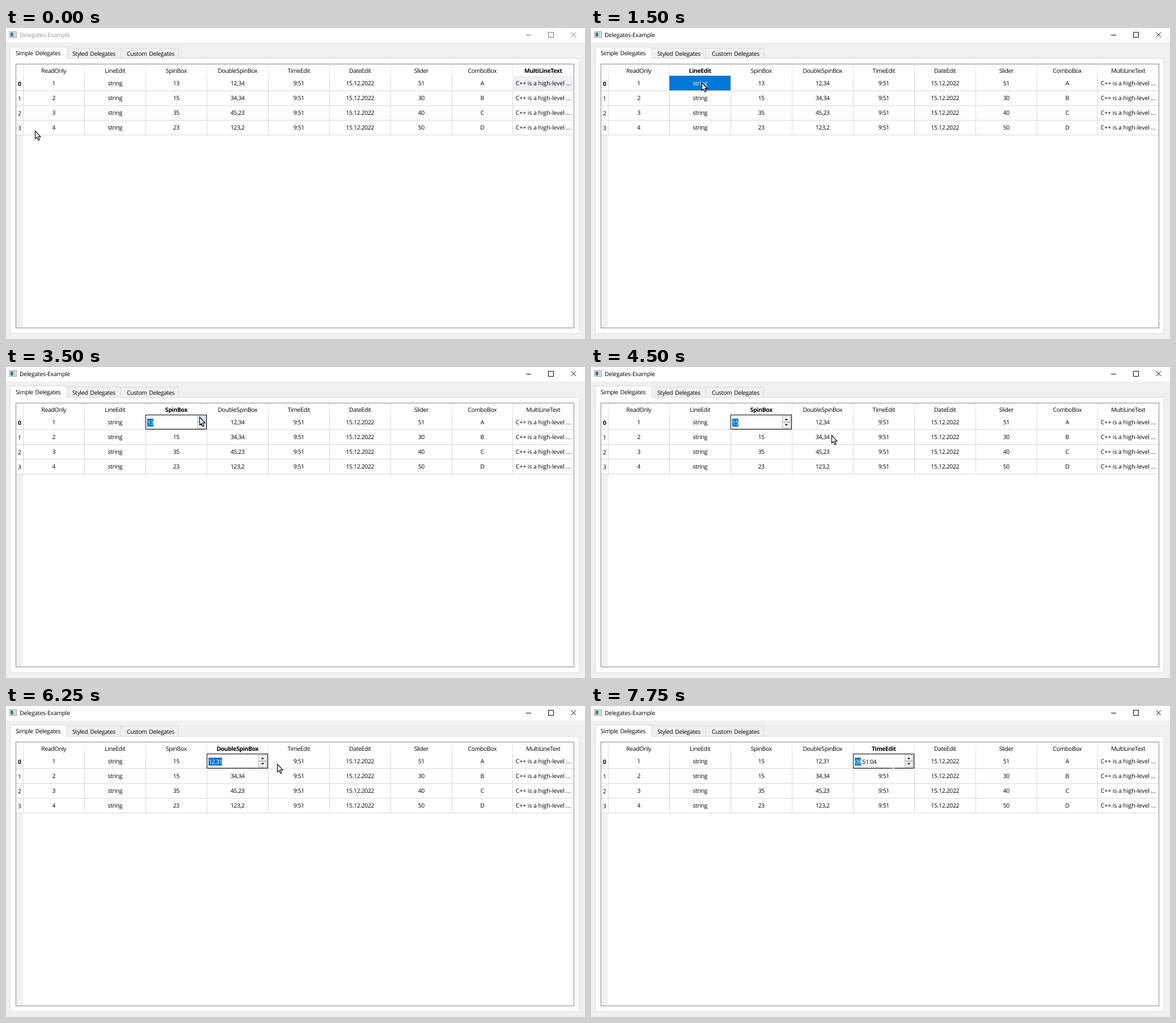
An HTML page that plays this animation: 1021 by 548 pixels, repeating every 8000 ms.

```html
<!DOCTYPE html>
<html lang="en">
<head>
<meta charset="utf-8">
<title>Delegates-Example</title>
<style>
html, body { margin: 0; width: 100%; height: 100%; overflow: hidden; background: #f0f0f0; }
svg { display: block; width: 1021px; height: 548px; }
text {
  font: 10.4px "Open Sans", "Noto Sans", sans-serif;
  letter-spacing: -.35px; word-spacing: 1.5px;
  text-rendering: geometricPrecision; fill: #000;
}
.mid { text-anchor: middle; }
.bold { font-weight: 700; }
.loose { letter-spacing: 0; word-spacing: 0; }
.title { letter-spacing: -.22px; }
</style>
</head>
<body>
<svg id="stage" viewBox="0 0 1021 548"></svg>
<script>
const NS = "http://www.w3.org/2000/svg";
const stage = document.getElementById("stage");
const LOOP = 8000;
const BLUE = "#0078d7", GRID = "#d8d8d8", EDGE = "#d9d9d9";
const TOP = 84, ROW = 26;
const edges = [30, 138, 246, 354, 462, 570, 678, 786, 893, 1001];
const heads = ["ReadOnly", "LineEdit", "SpinBox", "DoubleSpinBox", "TimeEdit",
  "DateEdit", "Slider", "ComboBox", "MultiLineText"];
const note = "C++ is a high-level ...";
const data = [
  ["13", "12,34", "51", "A"],
  ["15", "34,34", "30", "B"],
  ["35", "45,23", "40", "C"],
  ["23", "123,2", "50", "D"]
].map(([spin, dbl, slide, combo], i) =>
  [i + 1, "string", spin, dbl, "9:51", "15.12.2022", slide, combo, note]);

function add(tag, attrs, parent = stage) {
  const el = document.createElementNS(NS, tag);
  for (const k in attrs) el.setAttribute(k, attrs[k]);
  return parent.appendChild(el);
}
const box = (x, y, width, height, fill, stroke = "none", parent = stage) =>
  add("rect", { x, y, width, height, fill, stroke }, parent);
const line = (d, stroke, parent = stage) => add("path", { d, stroke, fill: "none" }, parent);
function label(str, x, y, cls = "", parent = stage) {
  const el = add("text", { x, y, class: cls }, parent);
  el.textContent = str;
  return el;
}
const center = c => (edges[c] + edges[c + 1]) / 2 + .3;

// Title bar
box(0, 0, 1021, 25.5, "#fff");
box(6.5, 6.5, 12, 10, "#f4f6f6", "#8b9496");
box(8, 8, 5, 7, "#3f8079");
box(14, 8, 3, 7, "#c9d0d2");
const title = label("Delegates-Example", 24, 16, "title");
const controls = line("M917 12.5H926M956.5 7.5H965.5V16.5H956.5ZM996.5 7.5L1005 16M1005 7.5L996.5 16", "#000");

// Tabs and pane
box(7.5, 53.5, 1003, 485, "#fff", "#dcdcdc");
box(107.5, 35.5, 95, 18, "#f0f0f0", EDGE);
box(202.5, 35.5, 102, 18, "#f0f0f0", EDGE);
box(8, 34, 99, 21, "#fff");
line("M7.5 54V33.5H107.5V53.5", EDGE);
label("Simple Delegates", 17, 48);
label("Styled Delegates", 117, 49);
label("Custom Delegates", 213, 49);

// Table
box(17.5, 63.5, 984, 465, "#fff", "#828790");
box(18, 189, 12, 339, "#f0f0f0");
edges.slice(0, -1).forEach(x => {
  line(`M${x + .5} 64V${TOP}`, "#e6e6e6");
  line(`M${x + .5} ${TOP}V188`, GRID);
});
const headText = heads.map((h, c) => label(h, center(c), 79, "mid"));
const cells = data.map((row, r) => {
  const y = TOP + r * ROW;
  line(`M18 ${y + 26.5}H1001`, GRID);
  label(r, 23.8, y + 18, r ? "mid" : "mid bold");
  return row.map((v, c) => label(v, center(c), y + 17, c === 8 ? "mid loose" : "mid"));
});

// Selected cell, drawn under the text of the first row
const pick = add("g", {});
stage.insertBefore(pick, cells[0][0]);
const pickFill = box(0, TOP, 108, 26, BLUE, "none", pick);
const pickRim = box(.5, TOP + .5, 107, 25, "none", "#6b7f88", pick);
pickRim.setAttribute("stroke-dasharray", "1 1");

// Cell editor
const editor = add("g", {});
const frame = box(.5, TOP + .5, 107, 25, "#fff", "#000", editor);
const mark = box(3, 91, 11, 14, BLUE, "none", editor);
const editText = label("", 3, 101.5, "", editor);
const spin = add("g", {}, editor);
const upBtn = box(91.5, 86.5, 14, 10, "#f0f0f0", "#bcbcbc", spin);
const downBtn = box(91.5, 97.5, 14, 10, "#f0f0f0", "#bcbcbc", spin);
add("path", { d: "M95.5 93.5L98.5 90.5L101.5 93.5ZM95.5 100.5L98.5 103.5L101.5 100.5Z", fill: "#222" }, spin);
const caret = line("M30.5 91V104", "#000", editor);
const beam = box(0, 109, 2, 1, "#fff", "none", editor);

const arrow = add("path", {
  d: "M.5 .5V14.2L3.6 11.4L6 16.8L8.2 15.8L5.9 10.6H10Z",
  fill: "#fff", stroke: "#000", "stroke-width": 1.1
});

// time, column, mode, pointer [x, y] (none = text beam), value, marked width, hovered button
const steps = [
  [0, 8, "idle", [51, 181]],
  [250, 8, "idle", [70, 136]],
  [500, 0, "pick", [84, 106]],
  [1000, 0, "pick", [120, 103]],
  [1250, 0, "pick", [172, 98]],
  [1500, 1, "pick", [195, 96]],
  [1750, 1, "edit", null, "string", 26],
  [2000, 1, "edit", null, "string", 0, "caret"],
  [2250, 1, "edit", null, "string", 0],
  [2500, 1, "edit", [254, 101], "string", 0],
  [2750, 2, "pick", [294, 104]],
  [3000, 2, "edit", null, "13", 11],
  [3250, 2, "edit", [340, 99], "13", 11, "down"],
  [3500, 2, "edit", [341, 88], "13", 11, "up"],
  [3750, 2, "edit", [341, 88], "14", 11, "up"],
  [4000, 2, "edit", [341, 88], "15", 11, "up"],
  [4250, 2, "edit", [366, 105], "15", 11],
  [4500, 2, "edit", [424, 120], "15", 11],
  [4750, 3, "pick", [414, 105]],
  [5000, 3, "edit", null, "12,34", 24],
  [5250, 3, "edit", [445, 101], "12,34", 24, "down"],
  [5500, 3, "edit", [449, 101], "12,33", 24, "down"],
  [5750, 3, "edit", [449, 101], "12,32", 24, "down"],
  [6000, 3, "edit", [449, 101], "12,31", 24, "down"],
  [6250, 3, "edit", [478, 102], "12,31", 24],
  [6500, 3, "edit", [508, 101], "12,31", 24],
  [6750, 4, "pick", [517, 101]],
  [7000, 4, "pick", [519, 100]],
  [7250, 4, "pick", [521, 100]],
  [7500, 4, "edit", null, "09:51:04", 11],
  [7750, 4, "edit", null, "09:51:04", 11]
];

const show = (el, on) => el.setAttribute("display", on ? "inline" : "none");

function setValue(str, marked) {
  const cut = marked > 11 ? str.length : marked ? 2 : 0;
  editText.textContent = "";
  [[str.slice(0, cut), "#fff"], [str.slice(cut), "#000"]].forEach(([part, fill]) => {
    add("tspan", { style: `fill:${fill}` }, editText).textContent = part;
  });
  mark.setAttribute("width", marked);
}

function render([time, col, mode, pointer, value = "", marked = 0, extra]) {
  const idle = mode === "idle", edit = mode === "edit";
  title.style.fill = idle ? "#999" : "#000";
  controls.setAttribute("stroke", idle ? "#777" : "#000");
  headText.forEach((h, c) => h.setAttribute("class", c === col ? "mid bold" : "mid"));
  cells[0][2].textContent = time < 4750 ? "13" : "15";
  cells[0][3].textContent = time < 6750 ? "12,34" : "12,31";
  cells[0].forEach((el, c) => {
    el.style.fill = mode === "pick" && c === col ? "#fff" : "#000";
    show(el, !(edit && c === col));
  });

  const place = `translate(${edges[col]} 0)`;
  show(pick, !edit);
  pick.setAttribute("transform", place);
  pickFill.setAttribute("fill", idle ? "#f0eff1" : BLUE);
  show(pickRim, !idle);

  show(editor, edit);
  if (edit) {
    editor.setAttribute("transform", place);
    frame.setAttribute("stroke", col === 1 ? "#555" : "#000");
    setValue(value, marked);
    show(spin, col > 1);
    upBtn.setAttribute("fill", extra === "up" ? "#d5e8f8" : "#f0f0f0");
    downBtn.setAttribute("fill", extra === "down" ? "#d5e8f8" : "#f0f0f0");
    show(caret, extra === "caret");
    show(beam, !pointer);
    beam.setAttribute("x", col === 4 ? 70 : 30);
  }
  show(arrow, pointer);
  if (pointer) arrow.setAttribute("transform", `translate(${pointer})`);
}

let current;
function tick(now) {
  const t = now % LOOP;
  const step = steps.findLast(s => s[0] <= t) || steps[0];
  if (step !== current) render(current = step);
  requestAnimationFrame(tick);
}
tick(0);
</script>
</body>
</html>
```
